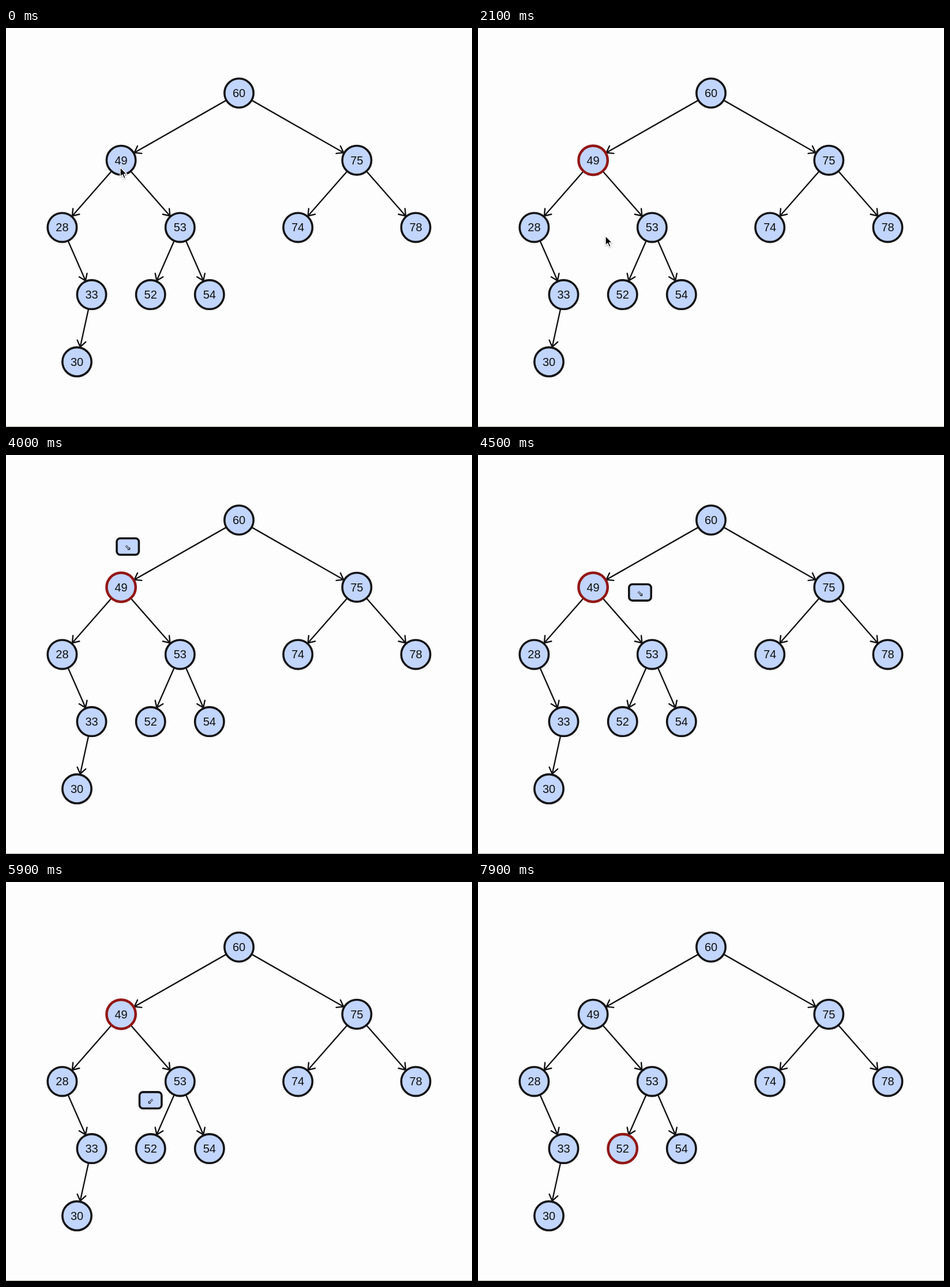
An HTML page for the animation above (8 s loop, 808 by 693 pixels).

```html
<!DOCTYPE html>
<html lang="en">
<head>
<meta charset="utf-8">
<title>Tree node removal</title>
<style>
  html, body { margin: 0; width: 100%; height: 100%; overflow: hidden; background: #fdfdfd; }
  svg { display: block; width: 808px; height: 693px; }
  text { font: 20px "Liberation Sans", Arial, sans-serif; text-anchor: middle; fill: #111; }
  .edge { fill: none; stroke: #141416; stroke-width: 2.4; stroke-linecap: round; }
  .node, #tag rect { fill: #c2d5fd; stroke: #141416; stroke-width: 3.6; }
  #tag text { font: 14px "DejaVu Sans", sans-serif; }
  .cursor { filter: drop-shadow(0 1.5px 1px #0005); stroke-linejoin: round; }
  #arrow { fill: #000; stroke: #fff; stroke-width: 1.4; }
  #hand { fill: #fff; stroke: #111; stroke-width: 1.2; }
</style>
</head>
<body>
<svg viewBox="0 0 808 693">
  <rect y="692" width="808" height="1" fill="#a5a49b"/>
  <g id="tree"></g>
  <g id="tag">
    <rect x="-19.2" y="-14.2" width="38.4" height="28.4" rx="6"/>
    <text y="6"></text>
  </g>
  <path id="arrow" class="cursor" d="M0 0V16.5L3.8 13 6.5 19.3 9.3 18.1 6.6 12H11.8Z"/>
  <g id="hand" class="cursor">
    <path d="M-1 1.5C0 .2 2 1 2.5 2.5L4.2 7.5C4.8 6.5 6.4 6.5 6.8 7.7 7.4 6.8 8.9 7 9.3 8.2
      10.1 7.6 11.5 8.2 11.8 9.4 12.4 12 12.4 14.4 11.5 16.4L11.2 19.4H3.7C3.2 17.4.7 15.4-1.8 11.9
      -2.6 10.5-.9 9.5.5 10.7L1.7 11.9-1 3.7Z"/>
    <path d="M5 12.2 5.7 16M7.3 12 8 16M9.6 12 9.8 16" fill="none" stroke-width="1"/>
  </g>
</svg>
<script>
const LOOP = 8000, STEP = 100, RADIUS = 25.2, TAG_LIFT = 84;
const $ = id => document.getElementById(id);
const [tagText] = $('tag').getElementsByTagName('text');

// value: [x, level, parent]
const nodes = {
  60: [404, 0], 49: [199.6, 1, 60], 75: [608.3, 1, 60],
  28: [97.4, 2, 49], 53: [301.8, 2, 49], 74: [506.1, 2, 75], 78: [710.5, 2, 75],
  33: [148.5, 3, 28], 52: [250.7, 3, 53], 54: [352.8, 3, 53], 30: [123, 4, 33]
};
const place = value => [nodes[value][0], 113 + 116.7 * nodes[value][1]];

function edge(from, to) {
  const [ax, ay] = place(from), [bx, by] = place(to);
  const angle = Math.atan2(by - ay, bx - ax);
  const polar = (x, y, r, a) => `${x + r * Math.cos(a)} ${y + r * Math.sin(a)}`;
  const tipX = bx - 26.5 * Math.cos(angle), tipY = by - 26.5 * Math.sin(angle);
  const barb = turn => polar(tipX, tipY, 12.8, angle + Math.PI + turn);
  return `<path class="edge" d="M${polar(ax, ay, 26, angle)}L${tipX} ${tipY}
    M${barb(.62)}L${tipX} ${tipY} ${barb(-.62)}"/>`;
}

function disc(value) {
  const [x, y] = place(value);
  return `<circle class="node" id="n${value}" cx="${x}" cy="${y}" r="${RADIUS}"/>
    <text x="${x}" y="${y + 7}">${value}</text>`;
}

const values = Object.keys(nodes);
$('tree').innerHTML = values.filter(v => nodes[v][2]).map(v => edge(nodes[v][2], v)).join('')
  + values.map(disc).join('');

const ramp = (t, start, end) => Math.min(1, Math.max(0, (t - start) / (end - start)));
const smooth = u => u * u * (3 - 2 * u);
const mix = (a, b, u) => a + (b - a) * u;

function highlight(value, amount) {
  const style = $('n' + value).style;
  const rgb = [[20, 146], [20, 24], [22, 22]].map(([a, b]) => Math.round(mix(a, b, amount)));
  style.stroke = `rgb(${rgb})`;
  style.strokeWidth = mix(3.6, 4.5, amount);
}

function moveCursor(t) {
  const idle = t < 100;
  const u = Math.max(0, (t - 1800) / 300);
  const x = idle ? 198 : 203 + 18 * u;
  const y = idle ? 242 : 238 + 123 * u * u;
  const pointing = !idle && y < 256;
  for (const id of ['arrow', 'hand']) {
    $(id).setAttribute('transform', `translate(${x} ${y})`);
    $(id).style.display = y < 710 && pointing === (id === 'hand') ? '' : 'none';
  }
}

function moveTag(t) {
  const goingLeft = t >= 4850;
  const [from, to] = goingLeft ? [53, 52] : [49, 53];
  const u = smooth(goingLeft ? ramp(t, 4900, 5800) : ramp(t, 3790, 4790));
  const [ax, ay] = place(from), [bx, by] = place(to);
  tagText.textContent = goingLeft ? '⇙' : '⇘';
  $('tag').setAttribute('transform', `translate(${mix(ax, bx, u)} ${mix(ay, by, u) - TAG_LIFT})`);
  $('tag').style.opacity = ramp(t, 3400, 3700) * (1 - ramp(t, 6100, 6400));
}

function draw(now) {
  const t = Math.floor(now % LOOP / STEP) * STEP;
  const handover = ramp(t, 6300, 6700);
  highlight(49, ramp(t, 500, 900) * (1 - handover));
  highlight(52, handover);
  moveTag(t);
  moveCursor(t);
}

const start = performance.now();
function tick() {
  draw(performance.now() - start);
  requestAnimationFrame(tick);
}
tick();
</script>
</body>
</html>
```
